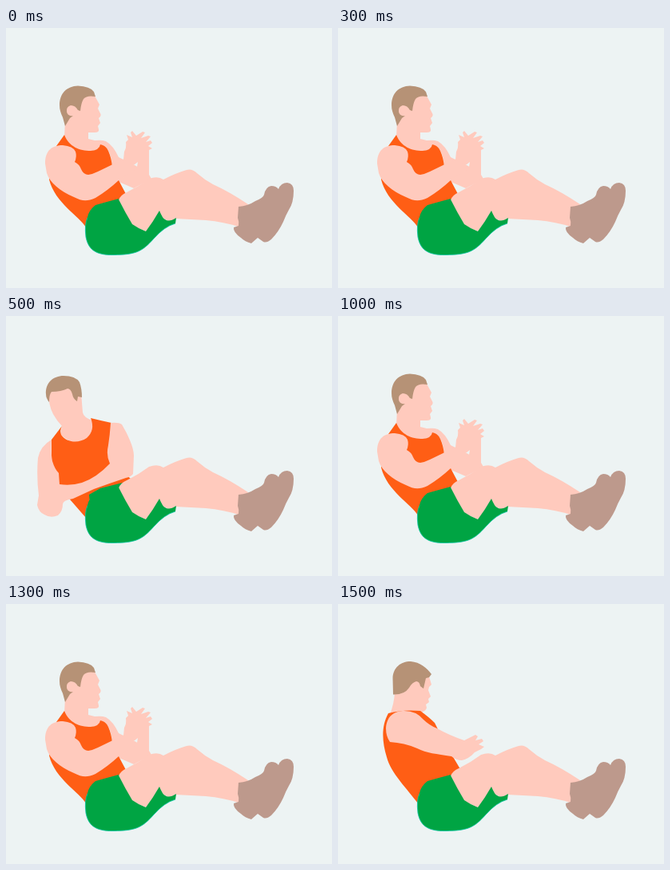
Animation, 408 px wide and 326 px high, one loop 2000 ms. Source, as an HTML page:

```html
<!DOCTYPE html>
<html lang="en">
<head>
<meta charset="utf-8">
<title>Seated twist</title>
<style>
  html, body { margin: 0; width: 100%; height: 100%; overflow: hidden; background: #edf3f3; }
  svg { display: block; width: 100%; height: 100%; }
  .bg { fill: #edf3f3; }
  .skin { fill: #ffcabd; }
  .hair { fill: #b69276; }
  .shirt { fill: #ff5e15; }
  .shorts { fill: #00a443; }
  .shoes { fill: #bd998c; }
  .hem { fill: none; stroke: #00c3a0; stroke-width: .8; }
  .pose { animation: 2s step-end infinite; }
  .center { animation-name: center; }
  .near { animation-name: near; }
  .far { animation-name: far; }
  @keyframes center { 0%, 50% { opacity: 1; } 25%, 75%, 100% { opacity: 0; } }
  @keyframes near { 0%, 50%, 100% { opacity: 0; } 25% { opacity: 1; } }
  @keyframes far { 0% { opacity: 0; } 75%, 100% { opacity: 1; } }
</style>
</head>
<body>
<svg viewBox="0 0 408 326">
  <g class="pose center">
    <path class="skin" d="M74 118L73 136Q82 153 100 156L119 151L124 148Q131 155 133 172L138 180L139 192L160 201L182 189L179 184V153L183 151L178 148L183 144L181 141L175 143L181 136L178 135L169 138L174 131L171 130L163 135L158 129L156 131L158 137L151 134L153 140L150 143Q151 150 148 155L147 165L141 162Q134 147 125 142Q120 140 111 141L103 139V131H111Q117 131 116 127L115 123L118 119L116 113Q120 110 118 107L115 101L117 96L111 85L94 80L76 98Z"/>
    <path class="bg" d="M158 172Q162 171 165 168L164 174Z"/>
    <path class="shirt" d="M73 134C79 149 92 154 106 154Q117 153 118 146Q125 147 128 154Q132 163 133 174L141 191L150 208L141 216L112 224L100 250C92 236 61 219 54 190L63 148Z"/>
    <path class="skin" d="M49 170C49 153 58 147 71 147Q84 148 87 155Q89 161 86 168Q92 171 94 177Q97 184 103 184Q109 183 115 180L148 164L166 175L141 191Q127 204 112 213C101 218 95 217 85 212C67 204 55 194 51 182Z"/>
    <path class="hair" d="M67 97C67 82 76 73 90 72.5Q105 73 110 80L112 86Q101 84 97 89Q94 94 93 104L90 103Q87 97 81 97Q75 99 76 105Q77 111 84 110L80 113L74 123L71 112Q67 104 67 97Z"/>
  </g>

  <g class="pose near">
    <path class="skin" d="M53 94Q53 112 59 123Q64 132 70 138L68 149L84 160L106 154L110 143L108 131Q97 127 96 121L94 96L79 85Z"/>
    <path class="shirt" d="M70 138Q67 144 69 149C76 159 91 160 101 153Q112 143 106 128Q118 131 132 134L133 184L156 204L141 214L106 224L100 253L80 230L57 200V155Z"/>
    <path class="skin" d="M131 134Q141 133 145 136C152 148 160 164 160 175L159 198Q156 202 150 203Q129 210 110 217L84 229Q71 231 71 236Q71 245 65 250Q56 254 48 249Q41 246 39 237L41 225Q38 201 40 178Q43 163 57 155Q56 172 58 182Q61 192 66 197L67 211Q82 213 95 209Q113 203 130 185Q125 175 128 162Q130 149 131 134Z"/>
    <path class="hair" d="M50 98C49 84 59 75 72 75Q87 75 92 83Q95 91 95 102L90 101L89 107Q84 104 83 98Q81 91 77 91Q69 95 57 95Q54 98 54 108Q50 103 50 98Z"/>
    <path class="shorts" d="M104 224L118 216L146 209L142 222L105 235Z"/>
  </g>

  <g class="pose far">
    <path class="skin" d="M71 111Q70 126 65 138L103 141L106 135Q110 134 111 130L110 126L114 123L113 119L116 116L113 108L114 104L117 101L114 91L98 87Z"/>
    <path class="shirt" d="M63 137Q82 132 103 134Q114 142 121 149L125 157L130 185L143 190L153 207L141 216L115 223L100 250C87 232 66 212 61 192C55 173 54 153 63 137Z"/>
    <path class="skin" d="M60 156C61 139 72 134 83 134Q98 134 107 145Q114 152 124 156Q140 165 158 171L172 164L175 166L172 171L180 169L182 172L176 176L183 179L179 182L171 186Q164 194 155 196Q148 196 142 191C123 188 111 187 99 181Q83 174 65 173Q60 166 60 156Z"/>
    <path class="hair" d="M69 113.5L68.5 93C69 80 78 72 91 72C103 73 111 80 117 88L114 92L110 93L107 106L103 103Q102 97 98 97Q93 98 89 105Q83 114 69 113.5Z"/>
  </g>

  <path class="skin" d="M141 216Q142 210 153 205Q167 198 179 189Q190 185 197 190Q212 182 226 178Q233 176 239 182Q248 190 259 196Q279 205 303 221L292 249.5Q273 243 250 241L212 239L207 244L192 236L175 255L157 247Z"/>
  <path class="shorts" d="M141 215Q149 231 158 246Q165 251 175 255Q184 243 192 229Q196 239 199 240Q204 244 213 238L212 245Q198 249 185 264C170 281 162 284 135 284.5C111 285 103 277 100 262Q98 246 102 237Q104 228 112 222Q126 218 141 214Z"/>
  <path class="hem" d="M102 238Q98 246 100 262C103 277 111 285 135 284.5C162 284 170 281 185 264Q198 249 212 245"/>
  <path class="shoes" d="M291 224Q303 223 312 217Q322 213 323 209Q325 199 332 198Q338 198 341 202Q344 194 352 194Q360 195 360 204Q360 219 354 228Q350 235 347 243Q341 256 332 265Q326 270 322 268L315 263L307 270Q299 268 294 263Q284 256 285 250L291 248Q292 243 290 238Z"/>
</svg>
</body>
</html>
```
